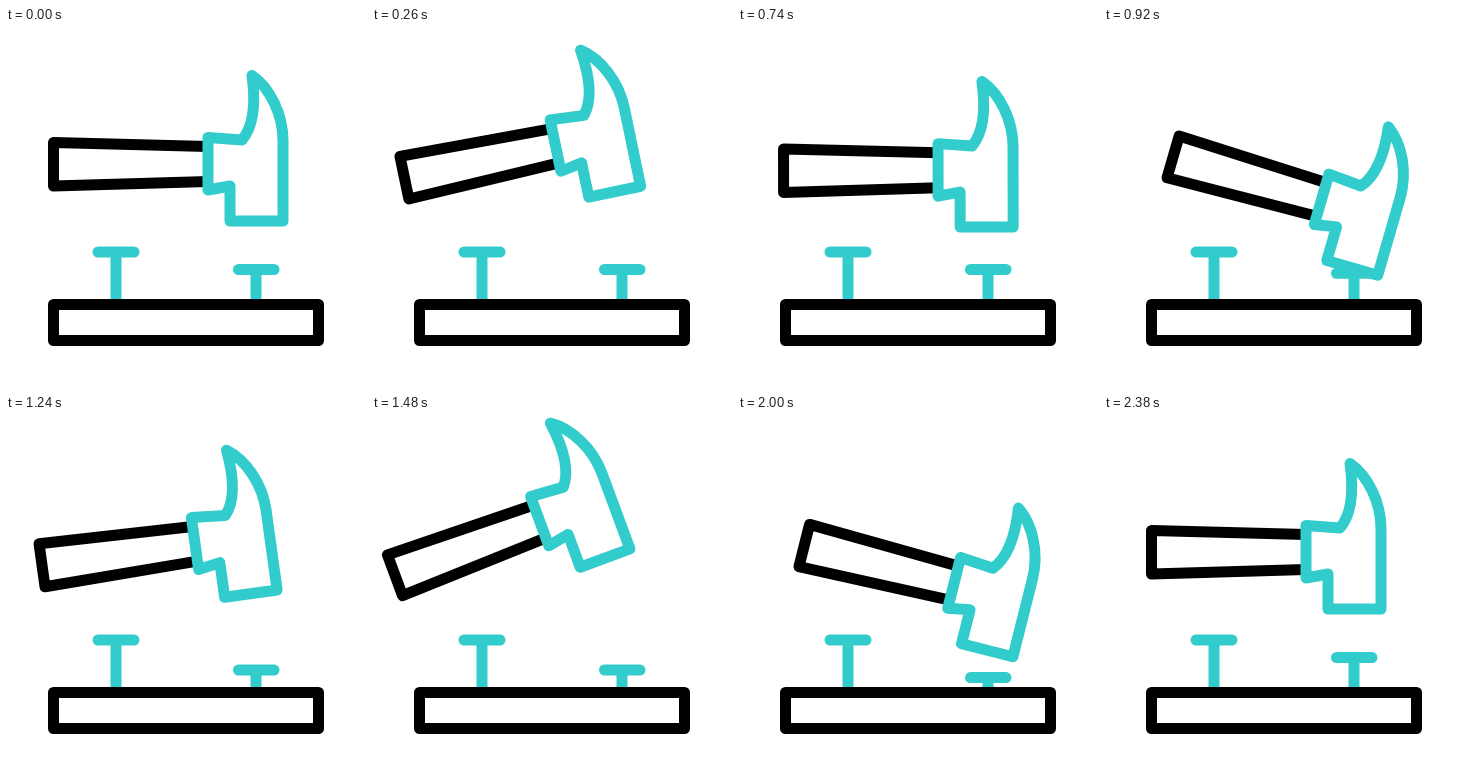
Animation, 360 px wide and 360 px high, one loop 2.4 s. Source, as an HTML page:

```html
<!DOCTYPE html>
<html lang="en">
<head>
<meta charset="utf-8">
<title>Hammer and nails</title>
<style>
  html, body { margin: 0; width: 100%; height: 100%; overflow: hidden; background: #fff; }
  svg { display: block; width: 100%; height: 100%; }
  svg * { stroke-width: 11; stroke-linejoin: round; }
  .teal { stroke: #33cccc; fill: none; }
  .black { stroke: #000; fill: none; }
  .cap { stroke-linecap: round; }
  .white { fill: #fff; }
</style>
</head>
<body>
<svg viewBox="0 0 360 360">
  <path class="teal" d="M110 224V273"/>
  <path class="teal cap" d="M92 224H128"/>
  <path class="teal" id="stem"/>
  <path class="teal cap" id="cap"/>
  <rect class="black white" x="47.5" y="276.5" width="265" height="36"/>
  <g id="hammer">
    <path class="black" d="M202 118.5L47.5 114.5V158L202 153.5"/>
    <path class="teal white" d="M202 162V109.5L236 112C248 98 249.5 73 246 47.5C264 60 277 86 277 113V193H224V158Z"/>
  </g>
</svg>
<script>
  const LOOP = 2400;
  const BEAT = 472;              // one stroke, up or down
  const HIT1 = 960, HIT2 = HIT1 + 2 * BEAT;
  const LIFT = HIT1 - BEAT;      // first time fully raised
  const RETURN = 376;

  const UP = { angle: -21.3, x: -30.7, y: 2.4 };
  const DOWN = { angle: 16.8, x: 21, y: 9.4 };

  const $ = id => document.getElementById(id);
  const hammer = $('hammer'), stem = $('stem'), cap = $('cap');

  // Eased 0 to 1, starting at `from` and lasting `span`
  function ramp(t, from, span) {
    const u = Math.min(1, Math.max(0, (t - from) / span));
    return (1 - Math.cos(Math.PI * u)) / 2;
  }

  // How far the hammer is raised and lowered; both zero at rest
  function swing(t) {
    if (t < LIFT) return [ramp(t, 0, LIFT), 0];
    if (t > HIT2) return [0, 1 - ramp(t, HIT2, RETURN)];
    const down = (1 - Math.cos(Math.PI * (t - LIFT) / BEAT)) / 2;
    return [1 - down, down];
  }

  function nailDepth(t) {
    const knock = hit => ramp(t, hit - 65, 70);
    return (12.5 * knock(HIT1) + 9.5 * knock(HIT2)) * (1 - ramp(t, 1940, 320));
  }

  function draw(t) {
    const [up, down] = swing(t);
    const mix = key => UP[key] * up + DOWN[key] * down;
    const y = 241.5 + nailDepth(t);
    hammer.setAttribute('transform',
      `translate(${mix('x')} ${mix('y')}) rotate(${mix('angle')} 107 133)`);
    stem.setAttribute('d', `M250 ${y}V273`);
    cap.setAttribute('d', `M232.5 ${y}H268`);
  }

  const start = performance.now();
  function tick() {
    draw((performance.now() - start) % LOOP);
    requestAnimationFrame(tick);
  }
  draw(0);
  requestAnimationFrame(tick);
</script>
</body>
</html>
```
